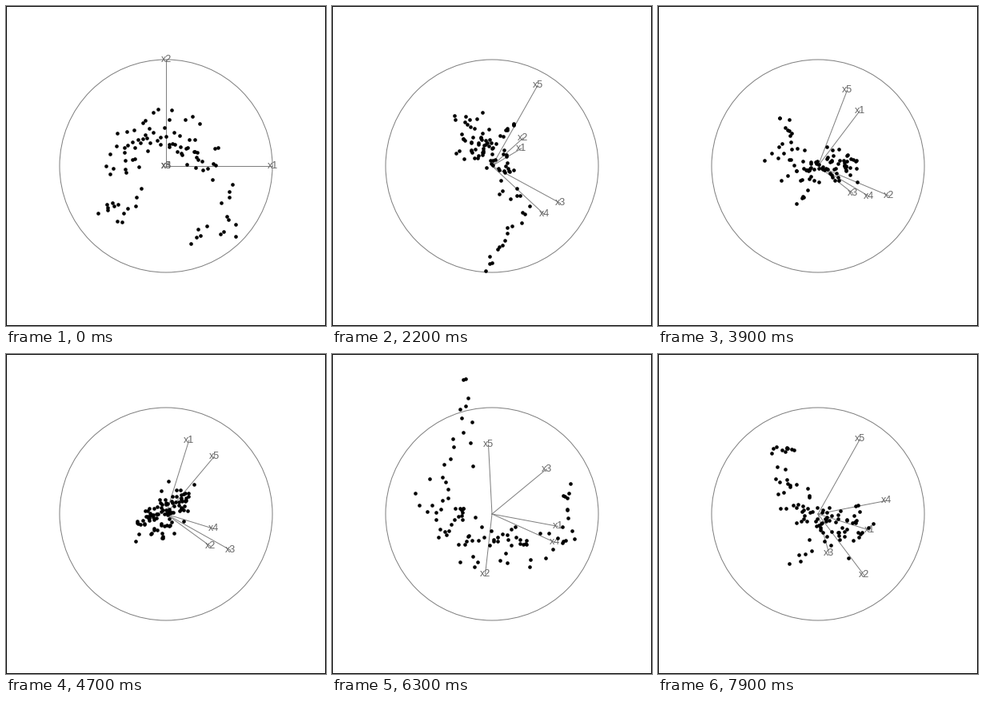
These frames come from a looping animation (400 by 400 pixels, 8000 ms). A matplotlib script:

```python
import numpy as np
import matplotlib.pyplot as plt
from matplotlib.animation import FuncAnimation
from matplotlib.patches import Circle, Rectangle

SIZE, MID, RADIUS = 400, 200, 133
FRAMES, STEP = 80, 100
PX = 0.72  # one pixel in points at 100 dpi
GREY, DARK_GREY = "#7f7f7f", "#666666"

# Key planes of the tour: where the tips of the five axes stand, in pixels.
TIMES = np.array([0, 8, 22, 32, 47, 63, 79])
TIPS = np.array([
    RADIUS * np.eye(5, 2),
    [(110, 4), (4, 117), (56, -29), (34, -32), (35, 46)],
    [(37, 22), (39, 35), (86, -47), (66, -61), (57, 101)],
    [(70, 39), (89, -20), (21, -18), (62, -52), (22, 113)],
    [(28, 92), (56, -41), (81, -46), (60, -19), (60, 72)],
    [(83, -16), (-8, -75), (68, 56), (79, -36), (-5, 87)],
    [(65, -21), (58, -77), (14, -49), (85, 16), (52, 94)],
]) / RADIUS
SLOPES = np.gradient(TIPS, TIMES, axis=0)

rng = np.random.default_rng(5)


def make_arm(n, *bends):
    """Points scattered along a bent line in five dimensions."""
    at = np.linspace(0, len(bends) - 1, n)
    line = [np.interp(at, range(len(bends)), axis) for axis in zip(*bends)]
    return np.column_stack(line) + rng.normal(0, 3.5, (n, 5))


def make_core(n):
    """Arch-shaped middle of the cloud, evenly spread along the arch."""
    angle = np.linspace(-0.2, 3.3, n) + rng.normal(0, 0.05, n)
    r = rng.uniform(24, 74, n)
    x1 = r * np.cos(angle) - 3
    x2 = r * np.sin(angle)
    x3 = -19 - 0.5 * (x2 - 24) + rng.normal(0, 15, n)
    x4 = 0.75 * x1 - 0.5 * (x2 - 24) + rng.normal(0, 16, n)
    x5 = -0.4 * x1 + rng.normal(0, 12, n)
    return np.column_stack([x1, x2, x3, x4, x5])


DATA = np.vstack([
    make_arm(15, (34, -92, -5, 104, -90), (48, -76, 15, 76, -76),
             (88, -84, 108, -30, -77), (70, -55, 70, 5, -55),
             (84, -24, 8, 78, -30)),
    make_arm(14, (-26, -24, 25, -30, 40), (-57, -72, 95, -80, 106),
             (-65, -42, 30, -22, 86), (-84, -62, -22, -5, 42)),
    make_core(71),
])


def basis(t):
    """Orthonormal 5 x 2 projection at time t, by Hermite interpolation."""
    i = min(np.searchsorted(TIMES, t, side="right") - 1, len(TIMES) - 2)
    span = TIMES[i + 1] - TIMES[i]
    u = (t - TIMES[i]) / span
    mix = (TIPS[i] * (1 + 2 * u) * (1 - u) ** 2
           + TIPS[i + 1] * u * u * (3 - 2 * u)
           + span * SLOPES[i] * u * (1 - u) ** 2
           - span * SLOPES[i + 1] * u * u * (1 - u))
    left, _, right = np.linalg.svd(mix, full_matrices=False)
    return left @ right


def to_stage(xy):
    return MID + xy * (1, -1)


fig = plt.figure(figsize=(SIZE / 100, SIZE / 100), dpi=100, facecolor="white")
ax = fig.add_axes([0, 0, 1, 1])
ax.set(xlim=(0, SIZE), ylim=(SIZE, 0))
ax.axis("off")

ax.add_patch(Rectangle((0.5, 0.5), SIZE - 1, SIZE - 1, fill=False, ec="black",
                       lw=PX, snap=False))
ax.add_patch(Circle((MID, MID), RADIUS, fill=False, ec=GREY, lw=PX))
spokes = [ax.plot([], [], color=GREY, lw=PX, zorder=2)[0] for _ in range(5)]
labels = [ax.text(MID, MID, f"x{k + 1}", color=DARK_GREY,
                  family="Liberation Sans", size=12.5 * PX,
                  ha="center", va="center", zorder=3)
          for k in range(5)]
dots, = ax.plot([], [], "o", color="black", ms=4.6 * PX, mew=0, zorder=4)


def draw(frame):
    proj = basis(frame)
    for spoke, label, (x, y) in zip(spokes, labels, to_stage(RADIUS * proj)):
        spoke.set_data([MID, x], [MID, y])
        label.set_position((x, y))
    dots.set_data(*to_stage(DATA @ proj).T)
    return [*spokes, *labels, dots]


anim = FuncAnimation(fig, draw, frames=FRAMES, interval=STEP, repeat=True,
                     repeat_delay=0, blit=False)
plt.show()
```
